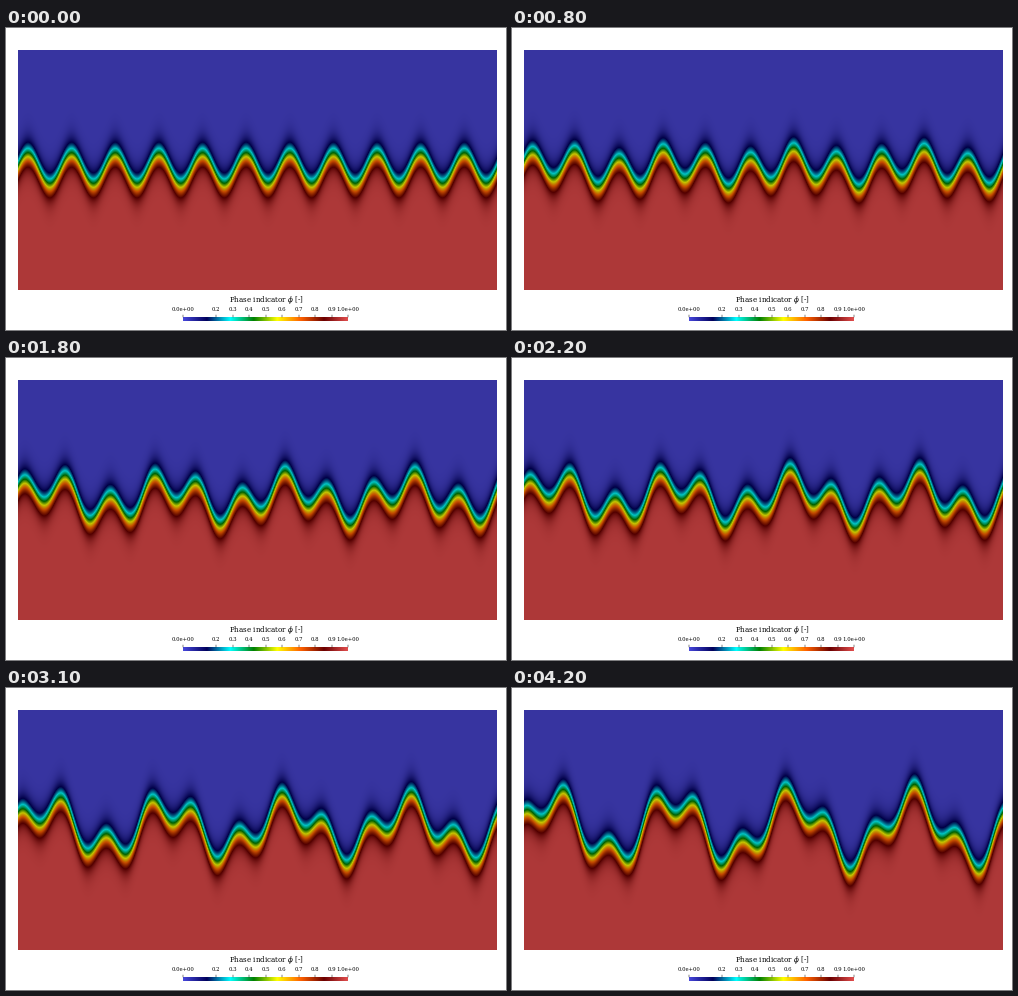
These frames come from a looping animation (500x302 px, 4.3 s). A matplotlib script:

```python
import numpy as np
import matplotlib.pyplot as plt
from matplotlib.animation import FuncAnimation

W, H, DPI = 500, 302, 100
FRAMES, INTERVAL = 43, 100

LEFT, RIGHT, TOP, BOTTOM = 12, 491, 22, 262
LENGTH = 480          # period of the whole domain, px
MID = 142             # rest height of the interface
THICKNESS = 14        # tanh length of the diffuse layer

STOPS = np.linspace(0, 1, 8)
BAR_COLORS = np.array([
    (71, 71, 219), (0, 0, 92), (0, 255, 255), (0, 128, 0),
    (255, 255, 0), (255, 97, 0), (107, 0, 0), (224, 77, 77)]) / 255
FIELD_COLORS = BAR_COLORS * 0.77   # the surface is dimmed by lighting
FIELD_COLORS[0] = np.array((56, 53, 161)) / 255
FIELD_COLORS[-1] = np.array((174, 57, 57)) / 255

plt.rcParams["font.family"] = "DejaVu Serif"
plt.rcParams["mathtext.fontset"] = "dejavuserif"


def colorize(phi, colors):
    return np.stack([np.interp(phi, STOPS, c) for c in colors.T], axis=-1)


def wave(x, mode, crest):
    return np.cos(2 * np.pi * mode * (x - crest) / LENGTH)


def interface(x, t):
    """Height of the interface: a drifting short wave plus a growing long one."""
    short = 15.3 * wave(x, 11, 22 - 2.8 * t)
    long = 6.8 * t * wave(x, 4, 44 - 0.8 * t)
    return MID - short - long


xs = np.arange(LEFT, RIGHT) + 0.5
ys = np.arange(TOP, BOTTOM)[:, None] + 0.5


def field(t):
    phi = 0.5 + 0.5 * np.tanh((ys - interface(xs, t)) / THICKNESS)
    return colorize(phi, FIELD_COLORS)


fig = plt.figure(figsize=(W / DPI, H / DPI), dpi=DPI, facecolor="white")
ax = fig.add_axes([0, 0, 1, 1])
ax.axis("off")


def show(rgb, left, right, top, bottom):
    return ax.imshow(rgb, extent=(left, right, bottom, top),
                     interpolation="nearest", aspect="auto")


def label(x, y, text, px):
    ax.text(x, y, text, fontsize=px * 72 / DPI, ha="center", va="baseline",
            color="black")


# Colour legend
BAR_X0, BAR_X1 = 177, 342
bar = colorize(np.linspace(0, 1, BAR_X1 - BAR_X0)[None, :], BAR_COLORS)
show(bar, BAR_X0, BAR_X1, 289, 293)

label(260, 274, r"Phase indicator $\phi$ [-]", 7.2)
ticks = {0: "0.0e+00", 1: "1.0e+00"}
ticks.update({n / 10: f"{n / 10:.1f}" for n in range(2, 10)})
for value, text in ticks.items():
    x = BAR_X0 + value * (BAR_X1 - BAR_X0)
    label(x, 283.3, text, 5.4)
    ax.plot([x, x], [286.5, 289], color="black", lw=0.35)

surface = show(field(0), LEFT, RIGHT, TOP, BOTTOM)
ax.set_xlim(0, W)
ax.set_ylim(H, 0)


def update(i):
    surface.set_data(field(i * INTERVAL / 1000))
    return [surface]


anim = FuncAnimation(fig, update, frames=FRAMES, interval=INTERVAL,
                     repeat=True, repeat_delay=0, blit=False)
plt.show()
```
